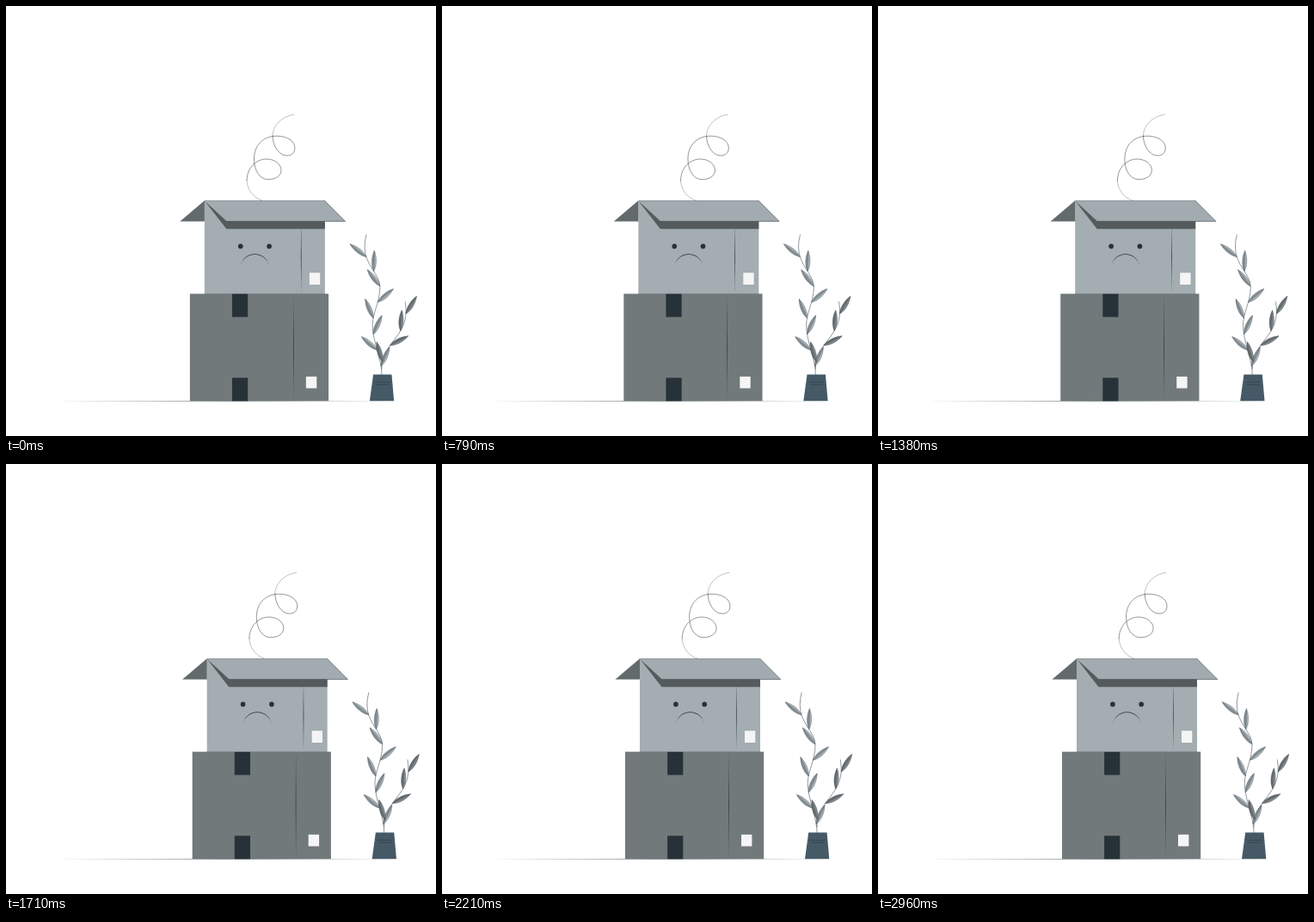
Recreate the animation shown at these times as an HTML page. Size 500 px wide and 500 px high, loop 3 s.

```html
<!DOCTYPE html>
<html lang="en">
<head>
<meta charset="utf-8">
<title>Sad box</title>
<style>
  html, body { margin: 0; width: 100%; height: 100%; overflow: hidden; background: #fff; }
  svg { display: block; width: 100vw; height: 100vh; }
  .dark { fill: #263238; }
  .label { fill: #f5f5f5; }
  .line { fill: none; stroke: #263238; stroke-width: .5; stroke-linecap: round; stroke-linejoin: round; }
  .faint { stroke-width: .3; }
</style>
</head>
<body>
<svg viewBox="0 0 500 500">
  <g id="scene">
    <path class="dark" d="M57.5 459.5 L255 459.2 L452 459.5 L255 459.8 Z"/>

    <!-- lower box -->
    <rect x="214" y="334.6" width="161.2" height="124.6" fill="#71797a"/>
    <rect class="dark" x="263.1" y="334.6" width="18.2" height="27"/>
    <rect class="dark" x="263.1" y="432.3" width="18.2" height="27"/>
    <path class="dark" d="M334.4 335 Q335.1 397 334.4 459 Q333.7 397 334.4 335"/>
    <rect class="label" x="349" y="430.9" width="12.4" height="13.6"/>

    <!-- upper box -->
    <rect x="231" y="226.6" width="140" height="108" fill="#a3adb2"/>
    <path class="line faint" d="M231 334.5 H371"/>
    <path class="dark" d="M343.3 250 Q344 292 343.3 334 Q342.6 292 343.3 250"/>
    <rect class="label" x="353" y="310.2" width="12.3" height="13.8"/>
    <path fill="#555b5c" d="M231 226.6 L256.5 259.2 H371 V249 H257 Z"/>
    <path fill="#626a6c" d="M231 226.6 L202.8 250.4 H231 Z"/>
    <path fill="#a1abb0" d="M231 226.6 H371 L394.8 250.4 H257 Z"/>
    <path class="line faint" d="M202.8 250.4 L231 226.5 H371"/>
    <path class="line" d="M371 226.6 L394.8 250.4 H257"/>

    <!-- face -->
    <circle class="dark" cx="272.9" cy="279.4" r="2.8"/>
    <circle class="dark" cx="306.2" cy="279.4" r="2.8"/>
    <path class="dark" d="M273 301.5 A16.9 16.9 0 0 1 306 301.5 A17.1 17.1 0 0 0 273 301.5"/>

    <!-- scribble -->
    <path class="line faint" d="M297.5 226 C287 223 280.2 212 280.2 203"/>
    <path class="line" d="M280.2 203 C280.2 188 291 178 303 178 C313 178 320.1 184 320.1 191
      C320.1 198 313 201.7 305 201.7 C295 201.7 288.6 191 288.6 178 C288.6 162 299 151.2 315 151.2
      C327 151.2 336 157 336 165 C336 171 332 174 327 174 C317 174 310.2 162 310.2 151"/>
    <path class="line faint" d="M310.2 151 C310.2 139 321 128 335 126.3"/>

    <!-- plant: stems run from the tip down -->
    <path id="tall" class="line" d="M419.1 266 Q417.2 273 417.2 280 C417.2 302 435 311 435 327
      C435 344 426.3 357 426.3 371 C426.3 390 437.5 412 437 428.5"/>
    <path id="short" class="line" d="M464.3 344 L465.3 353 C466 386 437 391 437 422"/>
    <g id="leaves"></g>
    <path fill="#455a66" d="M427.2 428.4 H448.6 L451.3 459.3 H423 Z"/>
    <path class="line" d="M429 437.4 H446.5 M431 440.2 H445"/>
  </g>
</svg>
<script>
const get = id => document.getElementById(id);
const scene = get("scene");

// Half a leaf, drawn upwards from its base at the origin
function half(size, side, fill) {
  return `<path d="M0 0 C${4 * side} ${-size * .28} ${3 * side} ${-size * .75} 0 ${-size} Z"
    fill="${fill}" stroke="#263238" stroke-width=".25" stroke-linejoin="round"/>`;
}

// Evenly spaced leaves on alternating sides, leaning away from the stem
function sprout(stem, { first, step, count, side, lean, fills }) {
  let out = "";
  for (let i = 0; i < count; i++, side = -side) {
    const at = first + i * step;
    const p = stem.getPointAtLength(at);
    const a = stem.getPointAtLength(at + 2), b = stem.getPointAtLength(at - 2);
    const turn = Math.atan2(b.x - a.x, a.y - b.y) * 180 / Math.PI + lean * side;
    out += `<g transform="translate(${p.x} ${p.y}) rotate(${turn})">
      ${half(24, 1, fills[0])}${half(24, -1, fills[1])}</g>`;
  }
  return out;
}

get("leaves").innerHTML =
  sprout(get("tall"), { first: 26, step: 19, count: 8, side: -1, lean: 34, fills: ["#a6b0b5", "#848f95"] }) +
  sprout(get("short"), { first: 14, step: 21, count: 4, side: 1, lean: 27, fills: ["#82898c", "#666d70"] });

// Sideways shake: swings alternate, doubling up to 4 px, then die down the same way
const loop = 3000, frames = 72, swings = 10;

function swing(k) {
  const n = Math.min(k, swings - k);
  return n && (-1) ** n * Math.min(4, 2 ** (n - 1));
}

function shift(ms) {
  const frame = Math.floor((ms + 5) * frames / loop) + 1;
  const pos = frame % frames / frames * swings, k = Math.floor(pos);
  return swing(k) + (swing(k + 1) - swing(k)) * (pos - k);
}

const start = performance.now();
function draw() {
  scene.setAttribute("transform", `translate(${shift(performance.now() - start)} 0)`);
  requestAnimationFrame(draw);
}
draw();
</script>
</body>
</html>
```
